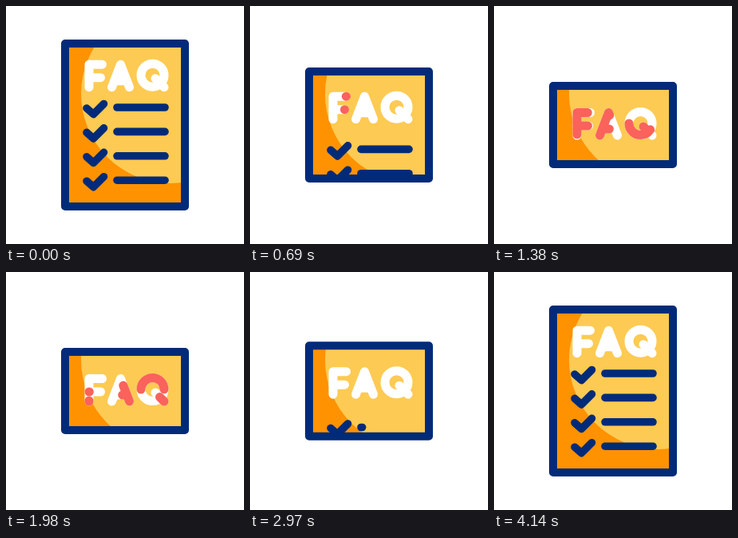
Recreate the animation shown at these times as an HTML page. Size 298 by 298 pixels, loop 4500 ms.

```html
<!DOCTYPE html>
<html lang="en">
<head>
<meta charset="utf-8">
<title>FAQ checklist</title>
<style>
  html, body { margin: 0; width: 100%; height: 100%; overflow: hidden; background: #fff; }
  svg { display: block; width: 100%; height: 100%; }
  path, #frame { fill: none; stroke-linecap: round; stroke-linejoin: round; }
  #letters path { stroke: #fff; stroke-width: 11; }
  #letters .sweep { stroke: #fa625c; }
  #rows path { stroke: #012b78; stroke-width: 9.6; }
  #frame { stroke: #012b78; stroke-width: 10; }
</style>
</head>
<body>
<svg viewBox="0 0 298 298" role="img" aria-label="FAQ">
  <clipPath id="page"><rect class="sheet" x="74" width="150"/></clipPath>
  <g clip-path="url(#page)">
    <rect width="298" height="298" fill="#ff9200"/>
    <circle cx="206" cy="110" r="112" fill="#fdca53"/>
    <g id="rows"></g>
    <g id="letters"></g>
  </g>
  <rect id="frame" class="sheet" x="74" width="150"/>
</svg>
<script>
const LOOP = 4500, ROWS = 4, LINE = 60, TAU = 160, GROW = 775;
const $ = id => document.getElementById(id);

function addPath(parent, d, className) {
  const path = document.createElementNS('http://www.w3.org/2000/svg', 'path');
  path.setAttribute('d', d);
  if (className) path.setAttribute('class', className);
  parent.append(path);
  return path;
}

// Letter strokes, with the times the red sweep enters and leaves
const letters = [
  { enter: 660, leave: 1250, strokes: ['M120.5-14.5H104V14', 'M118.5 2H104'] },
  { enter: 950, leave: 1500, strokes: ['M132.5 14L143.5-14.5L154.5 14', 'M136 6H151'] },
  { enter: 1030, leave: 1580, strokes: [
    'M169-1a14.5 14.5 0 1 0 29 0a14.5 14.5 0 1 0 -29 0', 'M187 3L198 14'] }
];
const SWEEP = 800;

letters.forEach(({ strokes }) => strokes.forEach(d => addPath($('letters'), d)));
const sweeps = letters.flatMap(({ enter, leave, strokes }) => strokes.map(d => {
  const path = addPath($('letters'), d, 'sweep');
  path.setAttribute('pathLength', 1);
  return { path, enter, leave };
}));

const lines = Array.from({ length: ROWS }, (_, i) => {
  const y = 127 + i * 30.4;
  addPath($('rows'), `M101 ${y + 1}L109.5 ${y + 8.5}L122.5 ${y - 4.5}`);
  return { path: addPath($('rows'), ''), y, start: 2965 + i * 133 };
});

const clamp = x => Math.min(1, Math.max(0, x));
const smooth = (t, start, span) => {
  const p = clamp((t - start) / span);
  return p * p * (3 - 2 * p);
};
const grow = t => {
  const rest = 2 ** (-GROW / TAU);
  return t >= GROW ? 1 : (1 - 2 ** (-t / TAU)) / (1 - rest);
};

function draw(t) {
  const fold = smooth(t, 270, 690) - smooth(t, 2810, 670);

  const half = 102 - 53 * fold;
  document.querySelectorAll('.sheet').forEach(sheet => {
    sheet.setAttribute('y', 149 - half);
    sheet.setAttribute('height', 2 * half);
  });
  $('letters').setAttribute('transform', `translate(0 ${87.7 + 60.3 * fold})`);
  $('rows').setAttribute('transform', `translate(0 ${79 * fold})`);

  for (const { path, enter, leave } of sweeps) {
    const from = smooth(t, leave, SWEEP), to = smooth(t, enter, SWEEP);
    path.style.display = to > 0 && from < 1 ? '' : 'none';
    path.setAttribute('stroke-dasharray', `${Math.max(0, to - from)} 3`);
    path.setAttribute('stroke-dashoffset', -from);
  }

  for (const { path, y, start } of lines) {
    const length = t < 2000 ? 1 : grow(t - start);
    path.style.display = length >= 0 ? '' : 'none';
    if (length >= 0) path.setAttribute('d', `M139 ${y}h${LINE * length}`);
  }
}

const begin = performance.now();
function tick() {
  draw((performance.now() - begin) % LOOP);
  requestAnimationFrame(tick);
}
tick();
</script>
</body>
</html>
```
